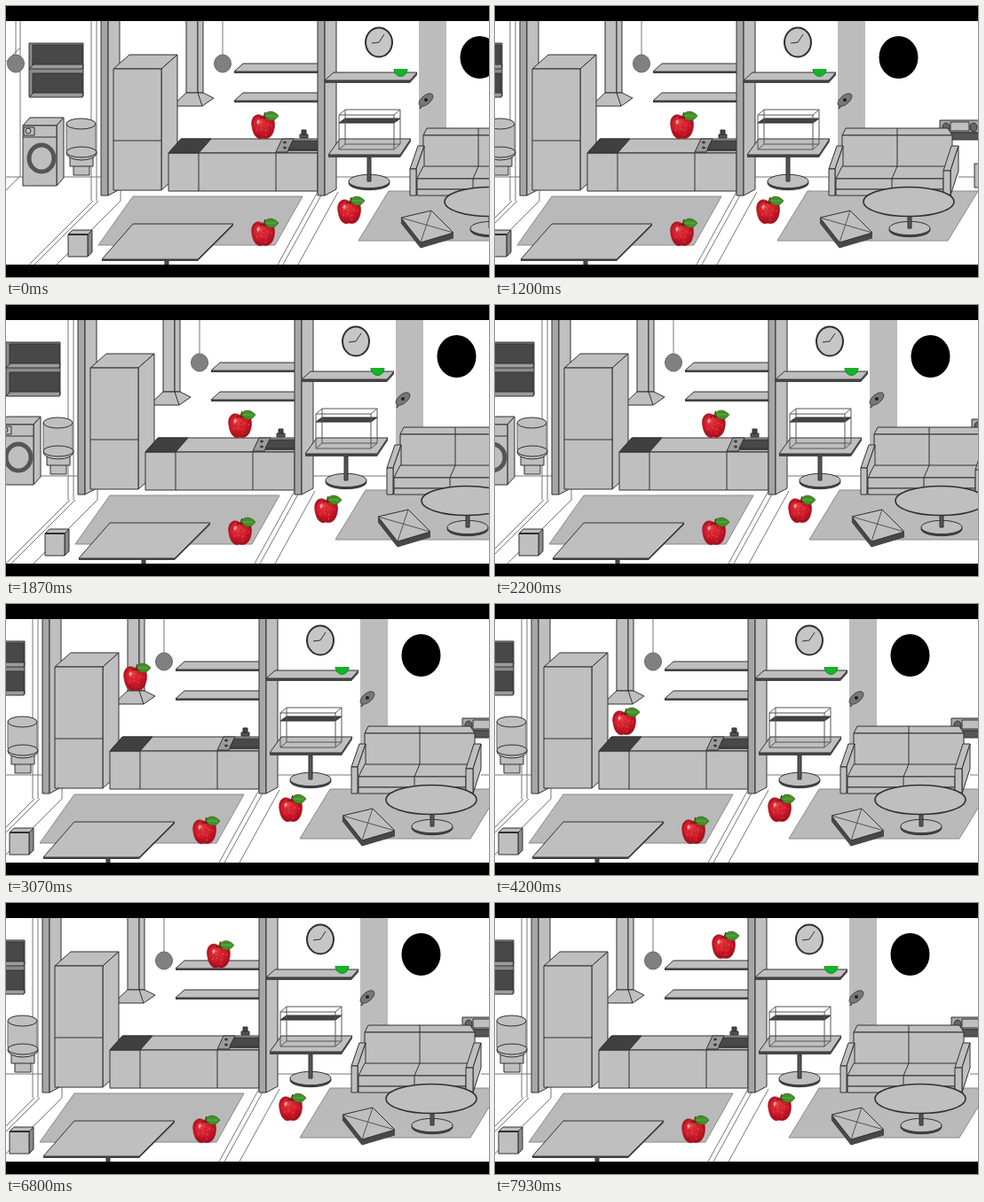
An HTML page with a canvas for the animation above (8000 ms loop, 544 by 306 pixels).

```html
<!DOCTYPE html>
<html lang="en">
<head>
<meta charset="utf-8">
<title>Apple in a house</title>
<style>
html, body { margin: 0; width: 100%; height: 100%; overflow: hidden; background: #000; }
canvas { display: block; width: 544px; height: 306px; }
</style>
</head>
<body>
<canvas id="stage" width="544" height="306"></canvas>
<script>
const ctx = document.getElementById('stage').getContext('2d');
const LOOP = 8000, TOP = 17, BOTTOM = 292, FLOOR = 193;
const GRAY = '#bfbfbf', MID = '#9c9c9c', DARK = '#484848', INK = '#303030', FAINT = '#777';

// Arrival time, then the place reached.
const PAN = [[0, 66], [1200, -13], [1870, 40], [2600, 0]];
const DRAG = [[0, 224, 134], [3070, 146, 82], [3600, 146, 132], [5400, 227, 65], [7300, 258, 47]];

// Rests at each place and eases to the next one just before its arrival time.
function glide(keys, t, span = 900) {
  const next = keys.findIndex(k => k[0] > t);
  if (next < 0) return keys.at(-1).slice(1);
  const [from, ...a] = keys[next - 1], [to, ...b] = keys[next];
  const begin = Math.max(from, to - span);
  const p = Math.max(0, (t - begin) / (to - begin));
  const eased = (1 - Math.cos(Math.PI * p)) / 2;
  return a.map((v, i) => v + (b[i] - v) * eased);
}

function paint(fill, stroke, width = 1) {
  if (fill) { ctx.fillStyle = fill; ctx.fill(); }
  if (stroke) { ctx.strokeStyle = stroke; ctx.lineWidth = width; ctx.stroke(); }
}
function poly(pts, fill = GRAY, stroke = INK) {
  ctx.beginPath();
  for (const [x, y] of pts) ctx.lineTo(x, y);
  ctx.closePath();
  paint(fill, stroke);
}
function rect(x, y, w, h, fill = GRAY, stroke = INK) {
  ctx.beginPath();
  ctx.rect(x, y, w, h);
  paint(fill, stroke);
}
function line(x1, y1, x2, y2, color = INK, width = 1) {
  ctx.beginPath();
  ctx.moveTo(x1, y1);
  ctx.lineTo(x2, y2);
  paint(null, color, width);
}
function oval(x, y, rx, ry = rx, fill = GRAY, stroke = INK, width = 1, turn = 0) {
  ctx.beginPath();
  ctx.ellipse(x, y, rx, ry, turn, 0, 7);
  paint(fill, stroke, width);
}

// Flat board seen from above; x is the front left corner, y the back edge.
function slab(x, y, w, depth, skew, thick = 0, { back = w, fill = GRAY, edge = INK } = {}) {
  const front = y + depth, right = x + skew + back;
  if (thick) {
    poly([[x, front], [x + w, front], [right, y], [right, y + thick],
          [x + w, front + thick], [x, front + thick]], DARK, null);
  }
  poly([[x, front], [x + skew, y], [right, y], [x + w, front]], fill, edge);
}
// Block with its front at x, y and its depth running up and to the right.
function block(x, y, w, h, dx, dy, side = GRAY) {
  slab(x, y - dy, w, dy, dx);
  const r = x + w;
  poly([[r, y], [r + dx, y - dy], [r + dx, y + h - dy], [r, y + h]], side);
  rect(x, y, w, h);
}
function stand(x, top, bottom, r) {
  oval(x, bottom + 2, r, r / 3, DARK);
  oval(x, bottom, r, r / 3);
  rect(x - 2, top, 4, bottom - top, '#555');
}
function lamp(x) {
  line(x, TOP, x, 56, FAINT);
  oval(x, 65, 9.5, 10, '#808080', '#666');
}
function pillar(x) {
  rect(x, 10, 8, 204, '#a6a6a6');
  poly([[x + 8, 10], [x + 21, 10], [x + 21, 207], [x + 8, 214]]);
}

function bathroom() {
  line(-66, FLOOR, 55, FLOOR, FAINT);
  line(-50, TOP, -50, 192, FAINT);
  for (const y of [47, 192]) line(-66, y + 16, -50, y, FAINT);
  for (const x of [30, 36]) line(x, TOP, x, 220, FAINT);
  for (const x of [32, 38, 63]) line(x, 220, x - 72, BOTTOM, FAINT);
  line(63, 208, 63, 220, FAINT);
  lamp(-55);

  rect(-40, 42, 61, 60, '#8c8c8c');
  for (const y of [44, 76]) {
    rect(-36, y, 56, 24, DARK);
    slab(-40, y + 22, 60, 5, 5, 0, { back: 56, fill: MID });
  }

  block(-47, 135, 38, 68, 8, 9);
  line(-47, 148, -9, 148);
  rect(-46, 137, 12, 9);
  oval(-41, 141, 3);
  oval(-26, 172, 14, 15, GRAY, '#555', 5);

  rect(10, 180, 18, 11);
  rect(6, 167, 26, 14);
  oval(19, 166, 17, 8);
  rect(2, 133, 33, 30, GRAY, '#666');
  oval(18.5, 133, 16.5, 6);
  oval(19, 165, 17, 6);
}

function kitchen() {
  pillar(41);
  rect(137, 10, 13, 88);
  rect(150, 10, 6, 88);
  poly([[121, 113], [137, 98], [156, 98], [168, 104], [155, 113]]);
  line(150, 98, 155, 113);

  block(55, 71, 54, 137, 18, 16);
  line(55, 152, 109, 152);
  lamp(178);
  for (const y of [65, 98]) slab(191, y, 96, 9, 10, 2);

  block(117, 166, 168, 43, 15, 16);
  for (const x of [151, 238]) line(x, 166, x, 209);
  slab(117, 150, 34, 16, 14, 0, { fill: '#404040' });
  slab(238, 150, 13, 15, 7, 0, { fill: MID });
  for (const y of [154, 160]) oval(248, y, 1.5, 1, DARK);
  slab(252, 152, 34, 10, 5, 2, { fill: DARK });
  rect(265, 145, 9, 4, '#555');
  rect(267, 140, 5, 5, '#444');

  slab(38, 215, 199, 55, 39, 0, { back: 191, fill: '#b9b9b9', edge: '#888' });
  rect(113, 286, 4, 10, DARK);
  slab(42, 246, 108, 40, 35, 2, { back: 113 });

  block(4, 258, 22, 25, 5, 5, '#8a8a8a');
  line(4, 258, 26, 258, INK, 2);

  for (const x of [285, 291, 308]) line(x, 210, x - 45, BOTTOM, FAINT);
  pillar(285);
}

function tank() {
  slab(309, 127, 62, 5, 7, 0, { fill: '#444' });
  for (const [x, y] of [[309, 123], [316, 117]]) rect(x, y, 62, 39, null, '#555');
  for (const x of [309, 371]) {
    for (const y of [123, 162]) line(x, y, x + 7, y - 6, '#555');
  }
}

function sofa() {
  slab(404, 138, 124, 8, 4, 0, { back: 115 });
  rect(404, 146, 124, 36);
  line(466, 138, 466, 182);
  block(389, 184, 7, 30, 9, 26);
  slab(397, 181, 121, 14, 7);
  for (const y of [195, 207]) rect(397, y, 121, y < 200 ? 12 : 7);
  line(466, 181, 460, 195);
  line(460, 195, 460, 207);
  block(518, 186, 8, 28, 9, 28);
}

function cushion() {
  const [a, b, c, d] = [[379, 239], [413, 231], [438, 256], [401, 267]];
  for (let drop = 6; drop > 0; drop--) {
    poly([a, b, c, d].map(([x, y]) => [x, y + drop]), DARK, DARK);
  }
  poly([a, b, c, d]);
  line(...a, ...c, '#555');
  line(...b, ...d, '#555');
}

function lounge() {
  line(306, FLOOR, 390, FLOOR, FAINT);
  line(535, FLOOR, 560, FLOOR, FAINT);
  rect(399, 10, 31, 175, '#bcbcbc', null);
  oval(467.5, 58, 22, 24, '#000', null);

  oval(354, 41, 15, 16.5, '#c6c6c6', INK, 2);
  line(354, 41, 360, 32);
  line(354, 41, 346, 42);

  slab(293, 75, 96, 9, 10, 3, { back: 94 });
  ctx.beginPath();
  ctx.ellipse(378.5, 71, 7.5, 8.5, 0, 0, Math.PI);
  paint('#14b428', '#0a8c1c');

  line(400, 116, 405, 108, '#555', 2);
  oval(407, 106, 9.5, 5, '#777', '#444', 1, -0.7);
  oval(407, 106, 2, 2, '#222', null);

  stand(343, 171, 198, 23);
  slab(297, 150, 81, 18, 13, 3, { back: 80 });
  tank();

  rect(514, 129, 51, 14, '#a8a8a8');
  rect(514, 143, 51, 8, '#555');
  rect(526, 131, 21, 10);
  for (const x of [521, 552]) oval(x, 137, 4, 5, '#666');
  rect(553, 178, 12, 27);

  slab(331, 209, 192, 56, 34, 0, { fill: '#bababa', edge: '#888' });
  sofa();
  cushion();
  stand(480, 237, 251, 23);
  oval(479, 221, 51, 16.5, GRAY, INK, 1.5);
}

function apple(x, y) {
  ctx.save();
  ctx.translate(x, y);
  const skin = ctx.createRadialGradient(-4, -3, 1, 0, 2, 17);
  skin.addColorStop(0, '#e63a40');
  skin.addColorStop(0.5, '#cf1a2a');
  skin.addColorStop(1, '#8a0814');
  ctx.beginPath();
  ctx.moveTo(0, -9);
  ctx.bezierCurveTo(-8, -15, -15, -8, -13, 2);
  ctx.bezierCurveTo(-12, 11, -7, 18, -1, 15);
  ctx.bezierCurveTo(8, 18, 12, 9, 12.5, 1);
  ctx.bezierCurveTo(13, -9, 7, -14, 0, -9);
  paint(skin, '#a50f1a', 0.6);
  oval(0, -8, 4, 1.5, '#8e1015', null);
  oval(-6, -3, 1.5, 2.5, '#f7a09c', null, 0, 0.4);
  for (let i = 0; i < 16; i++) {
    const r = 2.6 * Math.sqrt(i), a = i * 2.4;
    oval(r * Math.cos(a), 3 + r * Math.sin(a), 0.6, 0.6, i % 2 ? '#f07a76' : '#8a0d18', null);
  }
  line(0, -8, 2, -14, '#573a1c', 1.5);
  ctx.beginPath();
  ctx.moveTo(1, -10);
  ctx.bezierCurveTo(3, -16, 11, -17, 17, -10);
  ctx.bezierCurveTo(12, -3, 6, -3, 1, -10);
  paint('#43902a', '#2a641a', 0.7);
  line(3, -10, 14, -10, '#7fb851', 0.7);
  ctx.restore();
}

function draw(t) {
  ctx.fillStyle = '#fff';
  ctx.fillRect(0, 0, 544, 306);
  ctx.save();
  ctx.translate(glide(PAN, t)[0], 0);
  bathroom();
  kitchen();
  lounge();
  apple(224, 255);
  apple(321, 230);
  apple(...glide(DRAG, t));
  ctx.restore();
  ctx.fillStyle = '#000';
  ctx.fillRect(0, 0, 544, TOP);
  ctx.fillRect(0, BOTTOM, 544, 306 - BOTTOM);
}

let start;
function tick(now) {
  start ??= now;
  draw((now - start) % LOOP);
  requestAnimationFrame(tick);
}
draw(0);
requestAnimationFrame(tick);
</script>
</body>
</html>
```
